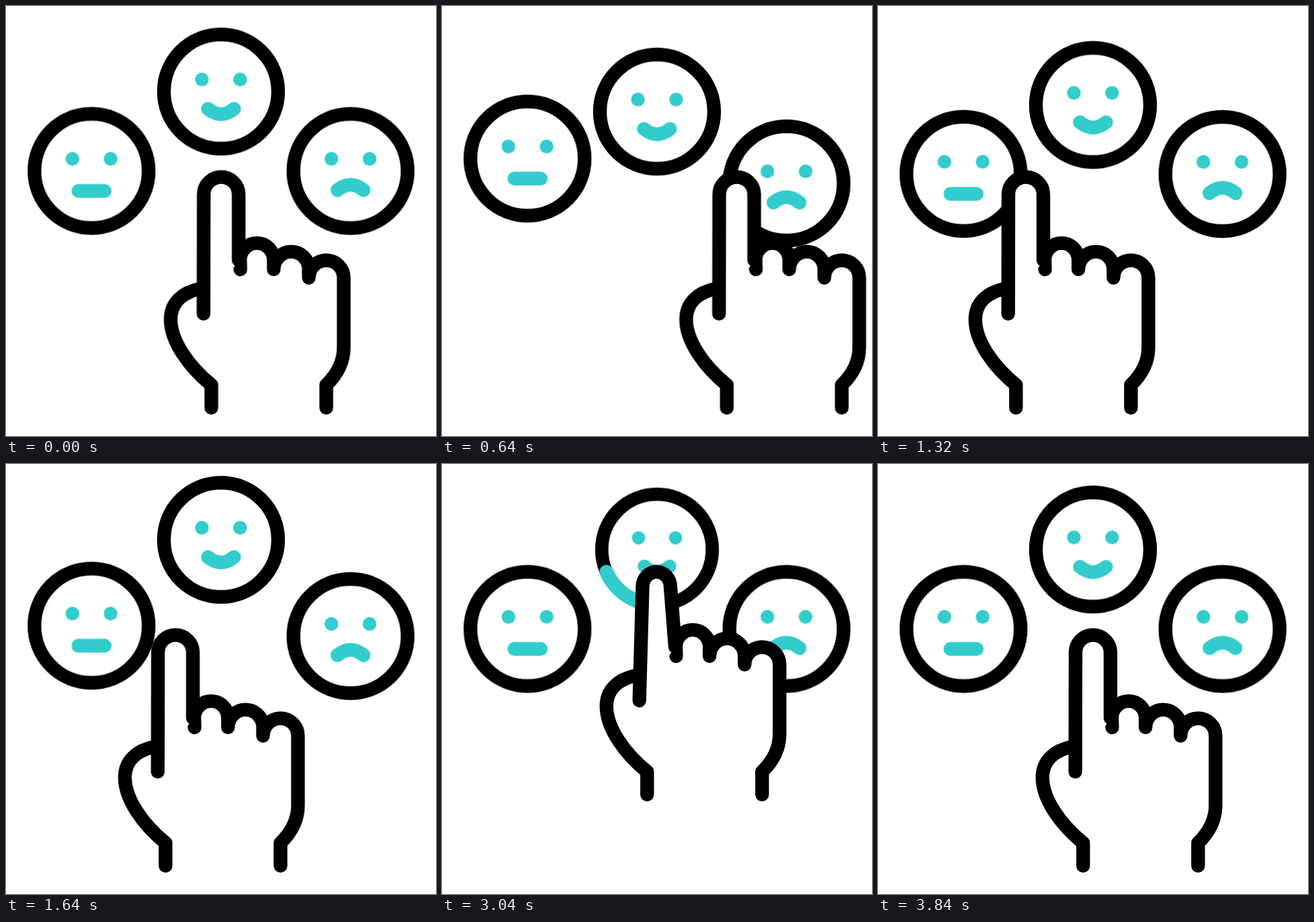
An HTML page that plays this animation: 640 by 640 pixels, repeating every 4000 ms.

```html
<!DOCTYPE html>
<html lang="en">
<head>
<meta charset="utf-8">
<title>Pick a mood</title>
<style>
  @property --head { syntax: "<length>"; inherits: false; initial-value: 0px; }
  @property --tail { syntax: "<length>"; inherits: false; initial-value: 0px; }

  html, body { margin: 0; width: 100%; height: 100%; overflow: hidden; background: #fff; }
  svg { display: block; width: 100vw; height: 100vh; }

  .line { fill: #fff; stroke: #000; stroke-width: 20.4; stroke-linecap: round; stroke-linejoin: round; }
  .eyes { fill: #3cc; }
  .mouth, .arc { fill: none; stroke: #3cc; stroke-width: 20.4; stroke-linecap: round; }

  .hand, .happy, .neutral, .sad, .press, .finger, .arc {
    animation: 4s cubic-bezier(.3333, 0, .6667, 1) infinite;
  }
  .hand { animation-name: hand; }
  .happy { animation-name: happy; }
  .neutral { animation-name: neutral; }
  .sad { animation-name: sad; }
  .press { animation-name: press; }
  .finger { animation-name: finger; }
  .arc {
    stroke-width: 21.4;
    stroke-dasharray: calc(var(--head) - var(--tail)) 200px;
    stroke-dashoffset: calc(-1 * var(--tail));
    animation-name: head, tail, show;
  }

  @keyframes hand {
    0%, 54.6%, 57.9%, 95.8%, 100% { transform: translate(0, 0); }
    15% { transform: translate(120.7px, 0); }
    32.75% { transform: translate(-100px, 0); }
    72%, 81.7% { transform: translate(0, -106px); }
  }

  /* the three faces bob while the hand hesitates */
  @keyframes happy {
    0%, 55%, 100% { transform: translateY(0); }
    15% { transform: translateY(32px); }
    24% { transform: translateY(-25.7px); }
    33% { transform: translateY(20px); }
    42% { transform: translateY(-15.6px); }
  }
  @keyframes neutral {
    0%, 55%, 100% { transform: translateY(0); }
    15% { transform: translateY(-19.6px); }
    24% { transform: translateY(13.8px); }
    42% { transform: translateY(-5px); }
  }
  @keyframes sad {
    0%, 55%, 100% { transform: translateY(0); }
    15% { transform: translateY(19.3px); }
    24% { transform: translateY(-1.7px); }
    42% { transform: translateY(10.7px); }
  }

  /* the tap */
  @keyframes press {
    0%, 70.8%, 81.5%, 100% { transform: scale(1); }
    76% { transform: scale(.968); }
  }
  @keyframes finger {
    0%, 70.8%, 81.5%, 100% {
      d: path("M293.7 458 L294 280.5 A26 26 0 0 1 346 280.5 L346 378");
    }
    76% {
      d: path("M293.7 458 L298.5 288.5 A20.7 22 0 0 1 340 288.5 L347 378");
    }
  }

  /* the ring is traced once around, its tail chasing its head */
  @keyframes head {
    0%, 72% { --head: 0px; }
    86.7%, 100% { --head: 100px; }
  }
  @keyframes tail {
    0%, 77.5% { --tail: 0px; }
    95.8%, 100% { --tail: 100px; }
  }
  @keyframes show {
    0%, 95.8%, 100% { opacity: 0; animation-timing-function: step-end; }
    72% { opacity: 1; animation-timing-function: step-end; }
  }
</style>
</head>
<body>
<svg viewBox="0 0 640 640">
  <defs>
    <g id="face">
      <circle class="line" r="85"/>
      <g class="eyes">
        <circle cx="-28.4" cy="-18" r="10.2"/>
        <circle cx="28.4" cy="-18" r="10.2"/>
      </g>
    </g>
  </defs>

  <g transform="translate(127.3 245.5)">
    <g class="neutral">
      <use href="#face"/>
      <path class="mouth" d="M-19.6 29.7H19.6"/>
    </g>
  </g>

  <g transform="translate(512.7 245.5)">
    <g class="sad">
      <use href="#face"/>
      <path class="mouth" d="M-19.5 28.5Q0 12.5 19.5 28.5"/>
    </g>
  </g>

  <g transform="translate(320 127.3)">
    <g class="happy">
      <g class="press">
        <use href="#face"/>
        <path class="mouth" d="M-19.5 25.7Q0 41.7 19.5 25.7"/>
        <path class="arc" pathLength="100" d="M0 85A85 85 0 0 1 0 -85A85 85 0 0 1 0 85"/>
      </g>
    </g>
  </g>

  <g class="hand">
    <path class="line" d="M290 420.5C262 426 244.8 442 244.8 466.5C244.8 499 272 537 305.3 564V598"/>
    <path class="line" d="M348.5 392L348 378A25 25 0 0 1 398.2 378V392A26.1 26.1 0 0 1 450.4 391.5V404.5A26 26 0 0 1 502.4 404.5V508C502.4 530 492 549 476.4 564V598"/>
    <path class="line finger" d="M293.7 458L294 280.5A26 26 0 0 1 346 280.5L346 378"/>
  </g>
</svg>
</body>
</html>
```
